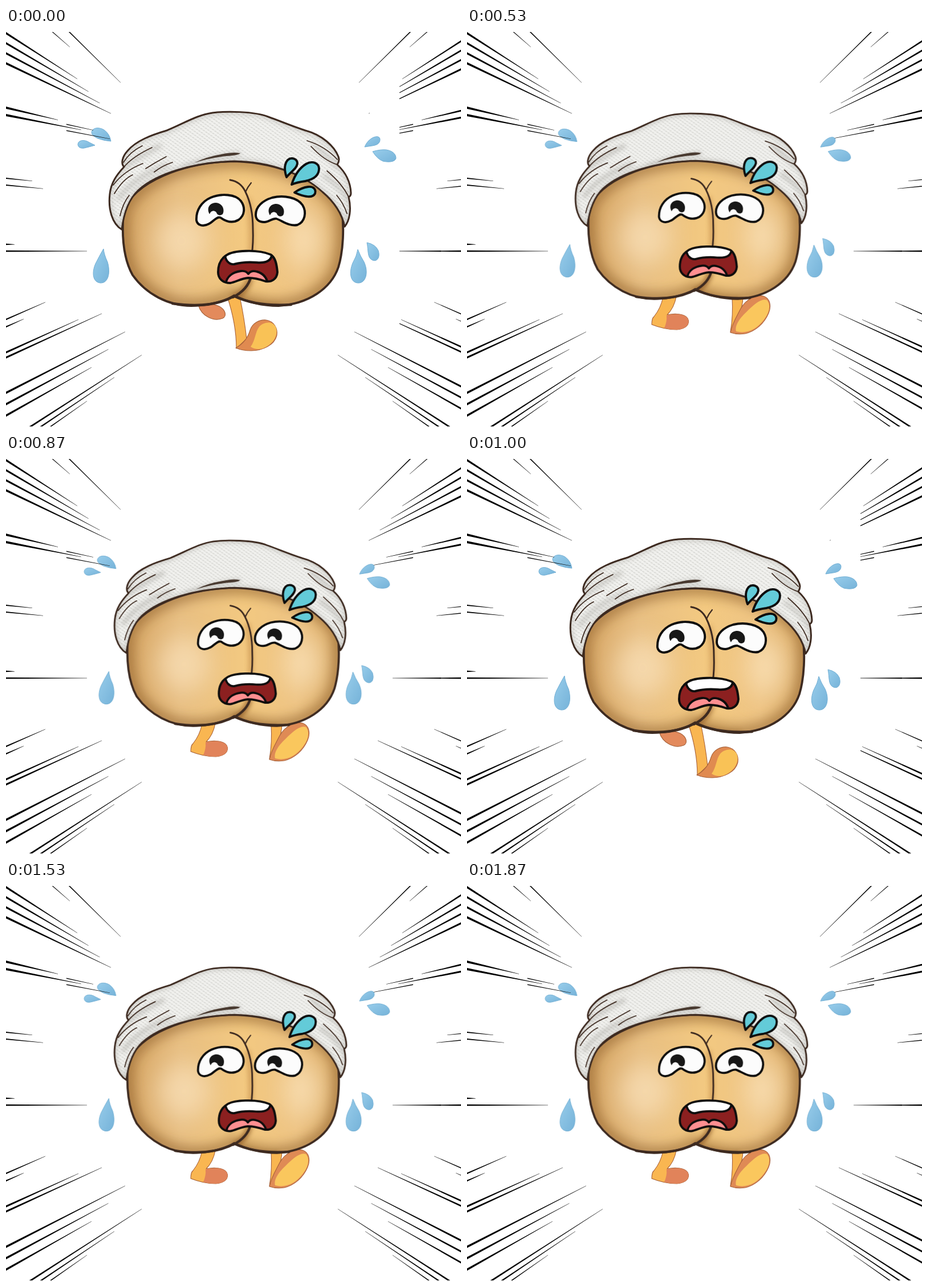
Recreate the animation shown at these times as an HTML page. Size 798 px wide and 701 px high, loop 1.99 s.

```html
<!DOCTYPE html>
<html lang="en">
<head>
<meta charset="utf-8">
<title>Running in a panic</title>
<style>
html, body { margin: 0; width: 100%; height: 100%; overflow: hidden; background: #fff; }
svg { display: block; width: 100vw; height: 100vh; }
.ink { fill: none; stroke: #3d2a20; stroke-linecap: round; stroke-linejoin: round; }
.bold { stroke: #0d0d0d; stroke-width: 3.9; stroke-linejoin: round; }
.foot { stroke: #a8623a; stroke-width: 1.1; stroke-linejoin: round; }
.drops path { fill: url(#water); stroke: #6fadd3; stroke-width: 1; }
</style>
</head>
<body>
<svg viewBox="0 0 798 701">
  <defs>
    <linearGradient id="water" x1="0" y1="0" x2="1" y2="1">
      <stop offset="0" stop-color="#98cdeb"/>
      <stop offset="1" stop-color="#76b3d9"/>
    </linearGradient>
    <linearGradient id="skin">
      <stop offset="0" stop-color="#d6a665"/>
      <stop offset=".25" stop-color="#e8bf83"/>
      <stop offset=".55" stop-color="#f3c981"/>
      <stop offset=".8" stop-color="#eec484"/>
      <stop offset="1" stop-color="#d9ab68"/>
    </linearGradient>
    <pattern id="knit" width="8" height="7" patternUnits="userSpaceOnUse" patternTransform="rotate(-6)">
      <rect width="8" height="7" fill="#f1f1ee"/>
      <path d="M1 1.2l2.6 1.4M5 4.7l2.6 1.4" stroke="#d2d2ce" stroke-width="1.4" stroke-linecap="round"/>
    </pattern>
    <filter id="soft" x="-50%" y="-50%" width="200%" height="200%"><feGaussianBlur stdDeviation="10"/></filter>
    <filter id="haze" x="-60%" y="-60%" width="220%" height="220%"><feGaussianBlur stdDeviation="22"/></filter>
    <filter id="fine" x="-50%" y="-50%" width="200%" height="200%"><feGaussianBlur stdDeviation="4"/></filter>
    <path id="body" d="M206 322C203 360 204 402 222 434C246 468 285 488 325 488C358 488 386 479 400 470C424 482 448 488 478 488C530 485 570 458 583 420C592 390 593 350 589 318C560 270 480 236 400 234C310 236 225 270 206 322Z"/>
    <path id="hat" d="M203 354C186 344 179 318 182 292C184 272 194 258 207 244C201 238 204 226 213 216C228 198 255 188 282 180C315 166 335 153 362 149C385 146 435 146 460 156C480 163 500 172 525 180C555 188 576 208 583 226C585 232 584 236 581 240C594 252 604 268 605 290C605 294 603 296 601 297C606 318 603 338 594 349C589 325 575 305 555 288C520 256 465 235 400 234C330 236 265 255 232 285C213 303 206 330 203 354Z"/>
    <path id="mouth" d="M387 399C398 391 440 388 464 398C473 403 475 417 476 429C475 441 466 447 455 445C444 441 436 439 425 439C412 440 404 446 393 448C380 448 372 440 372 429C372 416 377 405 387 399Z"/>
    <clipPath id="inBody"><use href="#body"/></clipPath>
    <clipPath id="inHat"><use href="#hat"/></clipPath>
    <clipPath id="inMouth"><use href="#mouth"/></clipPath>
    <clipPath id="page"><rect y="7" width="400" height="693"/></clipPath>
  </defs>

  <!-- right half mirrors the left one; pose A hides the ray tips -->
  <use href="#rays" transform="matrix(-1 0 0 1 820 0)"/>
  <rect id="gap" x="638" y="96" width="52" height="424" fill="#fff"/>

  <g id="legsA" class="foot">
    <path d="M337 486C347 484 362 484 374 489C385 495 388 506 380 510C366 516 343 508 337 486Z" fill="#e38a5c"/>
    <path d="M388 472L410 472Q418 510 422 546L404 563Q404 520 388 472Z" fill="#f9b651"/>
    <path d="M403 562C414 556 424 545 428 531C432 518 445 512 456 513C470 515 477 528 475 540C471 557 450 567 430 567Q414 567 403 562Z" fill="#e08a50"/>
    <path d="M429 560C437 550 437 534 444 525C452 516 467 514 473 525C479 540 467 557 450 563Q438 566 429 560Z" fill="#f9c256" stroke="none"/>
  </g>
  <g id="legsB" class="foot">
    <path d="M344 472L367 472C364 488 358 497 351 504C365 501 381 502 387 510C392 520 384 529 368 530C350 530 334 525 324 521Q324 510 328 507Q340 492 344 472Z" fill="#f9b651"/>
    <path d="M350 505C365 501 381 502 387 510C392 520 384 529 368 530Q356 530 346 527Q351 516 350 505Z" fill="#e1835a" stroke="none"/>
    <path d="M465 474L484 474Q483 500 462 534Q467 505 465 474Z" fill="#f9b651"/>
    <path d="M462 535C465 519 473 507 480 493C490 476 506 468 520 471C532 475 534 489 529 501C521 520 505 533 488 537Q473 539 462 535Z" fill="#df8a55"/>
    <path d="M472 533C469 522 480 508 491 498C502 487 516 474 526 478C534 487 529 502 521 512C508 530 489 538 472 533Z" fill="#fac75d" stroke="none"/>
  </g>

  <g id="runner">
    <g class="drops">
      <path d="M150 183C152 174 164 174 172 179Q182 186 184 199Q171 198 161 194Q150 189 150 183Z"/>
      <path d="M126 204C127 196 139 196 146 201L156 206Q146 209 137 211C130 212 126 209 126 204Z"/>
      <path d="M629 209Q633 199 641 194C649 189 656 190 656 196C656 203 650 206 642 207Z"/>
      <path d="M643 217Q657 213 667 214C679 216 684 222 684 229C682 236 670 236 661 234Q651 230 643 217Z"/>
      <path d="M171 388Q172 398 178 411C183 427 181 448 166 448C152 447 150 430 157 414Q164 400 171 388Z"/>
      <path d="M617 389Q621 400 628 411C636 428 632 448 618 448C604 448 601 430 608 413Q615 401 617 389Z"/>
      <path d="M633 377Q648 380 653 391C657 404 650 411 643 408C633 404 636 391 633 377Z"/>
    </g>

    <use href="#body" fill="url(#skin)"/>
    <g clip-path="url(#inBody)">
      <use href="#body" fill="none" stroke="#8c5d2a" stroke-width="26" filter="url(#soft)" opacity=".55"/>
      <ellipse cx="308" cy="374" rx="48" ry="52" fill="#f8deb6" filter="url(#haze)" opacity=".8"/>
      <ellipse cx="525" cy="372" rx="34" ry="52" fill="#fae1b8" filter="url(#haze)" opacity=".8"/>
      <path d="M424 300Q434 350 429 410T398 478" fill="none" stroke="#b67a37" stroke-width="10" filter="url(#fine)" opacity=".4"/>
      <path d="M398 474Q422 462 429 440M398 474Q440 492 480 490" fill="none" stroke="#7d4d22" stroke-width="10" filter="url(#fine)" opacity=".5"/>
    </g>
    <use href="#body" class="ink" stroke-width="3.8"/>
    <path class="ink" stroke-width="4.5" d="M292 484Q360 494 400 471Q440 490 500 486M430 436Q424 460 398 473"/>
    <path class="ink" stroke-width="3" d="M393 267C406 269 415 277 420 288C429 306 433 330 433 352Q434 378 431 398"/>
    <path class="ink" stroke-width="2.2" d="M430 272Q424 279 420 288"/>

    <use href="#hat" fill="url(#knit)"/>
    <g clip-path="url(#inHat)" fill="none" stroke="#8f8c85" stroke-width="8" opacity=".35">
      <use href="#hat" filter="url(#fine)"/>
      <path d="M208 244Q236 224 272 206M196 302Q222 262 285 240M310 246Q365 224 411 221M540 205Q565 225 582 244M556 258Q584 276 601 302" filter="url(#fine)"/>
    </g>
    <use href="#hat" class="ink" stroke-width="3"/>
    <g class="ink" stroke-width="1.8">
      <path d="M207 244Q222 226 256 210M206 236Q218 217 239 207M188 276Q207 251 240 238M190 291Q205 266 222 258M200 330Q205 308 216 294"/>
      <path d="M245 247Q262 236 281 226M260 253Q274 242 292 236"/>
      <path d="M581 240Q558 233 535 208M581 231Q560 208 528 198M601 297Q590 274 563 251M598 326Q592 308 580 294"/>
    </g>
    <path d="M330 237Q352 226 377 222Q398 217 411 220Q407 224 386 225Q355 229 330 237Z" fill="#493a30"/>

    <g class="bold" fill="#63cbd8">
      <path d="M492 262C488 250 488 239 494 232C501 226 511 230 511 238C510 247 500 252 492 262Z"/>
      <path d="M501 275C506 259 515 246 526 239C538 232 549 238 549 247C549 260 539 266 525 269Q510 271 501 275Z"/>
      <path d="M506 289Q519 280 530 279C540 278 544 284 542 291C537 300 521 296 506 289Z"/>
    </g>

    <g class="bold" fill="#fcfcfc">
      <path d="M334 338C333 320 343 305 359 298C378 290 403 292 412 304C420 315 419 329 408 337C396 344 384 339 376 333C369 331 364 340 356 344C347 349 336 348 334 338Z"/>
      <path d="M438 328C438 314 450 303 467 298C488 293 511 298 520 311C528 324 524 341 511 346C496 349 484 338 474 335C466 334 462 341 453 341C443 341 438 336 438 328Z"/>
    </g>
    <g fill="#171717">
      <path id="pupil" d="M357 327C351 317 357 307 368 307C380 308 384 319 380 327C375 331 370 328 369 324C365 319 359 321 357 327Z"/>
      <use href="#pupil" x="106" y="2"/>
    </g>

    <use href="#mouth" fill="#8c2020"/>
    <g clip-path="url(#inMouth)" class="bold">
      <path fill="#ff8f91" d="M385 452C386 437 397 429 412 427Q421 426 425 432Q430 425 440 428C452 431 458 440 460 452Z"/>
      <path fill="#fff" d="M384 399C390 385 460 385 466 400C464 410 453 413 440 412Q418 410 400 415C392 416 385 409 384 399Z"/>
    </g>
    <use href="#mouth" class="bold" fill="none"/>
  </g>

  <g id="rays" clip-path="url(#page)"><path id="fans"/></g>
</svg>
<script>
const $ = id => document.getElementById(id);
const mix = (a, b, k) => a + (b - a) * k;

// Rays steepen away from the middle of the left edge.
function slope(y) {
  if (y < 153) return .197 + (153 - y) * .0031;
  if (y < 400) return .197 * (392 - y) / 239;
  return -.44 - .26 * ((y - 512) / 243) ** 2;
}

// A tapering ray that leaves the left edge at height y.
function ray(y, start, end, width) {
  const at = x => y + slope(y) * x;
  const w = width / 2, tip = .25;
  return `M${start} ${at(start) - w}L${end} ${at(end) - tip}V${at(end) + tip}L${start} ${at(start) + w}Z`;
}

function fan(count, [y0, y1], [end0, end1], width = 3.4, start = 0) {
  let d = "";
  for (let i = 0; i < count; i++) {
    const k = i / (count - 1);
    d += ray(mix(y0, y1, k), start, mix(end0, end1, k), width);
  }
  return d;
}

$("fans").setAttribute("d", [
  fan(2, [-103, -64], [201, 112], 4.5),
  fan(4, [9, 62], [125, 184], 3.8),
  fan(2, [140, 153], [91, 132], 4),
  fan(2, [146, 160], [153, 182], 1.6, 106),
  fan(2, [264, 276], [46, 65], 2),
  fan(2, [380, 392], [15, 142], 2.6),
  fan(2, [512, 525], [69, 31], 2.4),
  fan(2, [570, 579], [127, 168]),
  fan(3, [641, 681], [209, 150], 3.8),
  fan(3, [728, 755], [238, 142], 3.8)
].join(""));

// The two poses alternate: three even steps, then a longer cycle of pairs.
const loop = 1990;
const cuts = [0, 200, 330, 530, 670, 870, 1000, 1200, 1330, 1530, 1670, 1870];

function flip(id, poseA, poseB) {
  const frames = cuts.map((t, i) => ({ offset: t / loop, easing: "step-end", ...(i % 2 ? poseB : poseA) }));
  frames.push({ offset: 1, ...poseA });
  $(id).animate(frames, { duration: loop, iterations: Infinity }).startTime = 0;
}

const on = { opacity: 1 }, off = { opacity: 0 };
flip("runner", { transform: "matrix(1, 0, 0, 1, 0, 0)" }, { transform: "matrix(.96, 0, 0, .956, 16.2, 9.4)" });
flip("legsA", on, off);
flip("legsB", off, on);
flip("gap", on, off);
</script>
</body>
</html>
```
